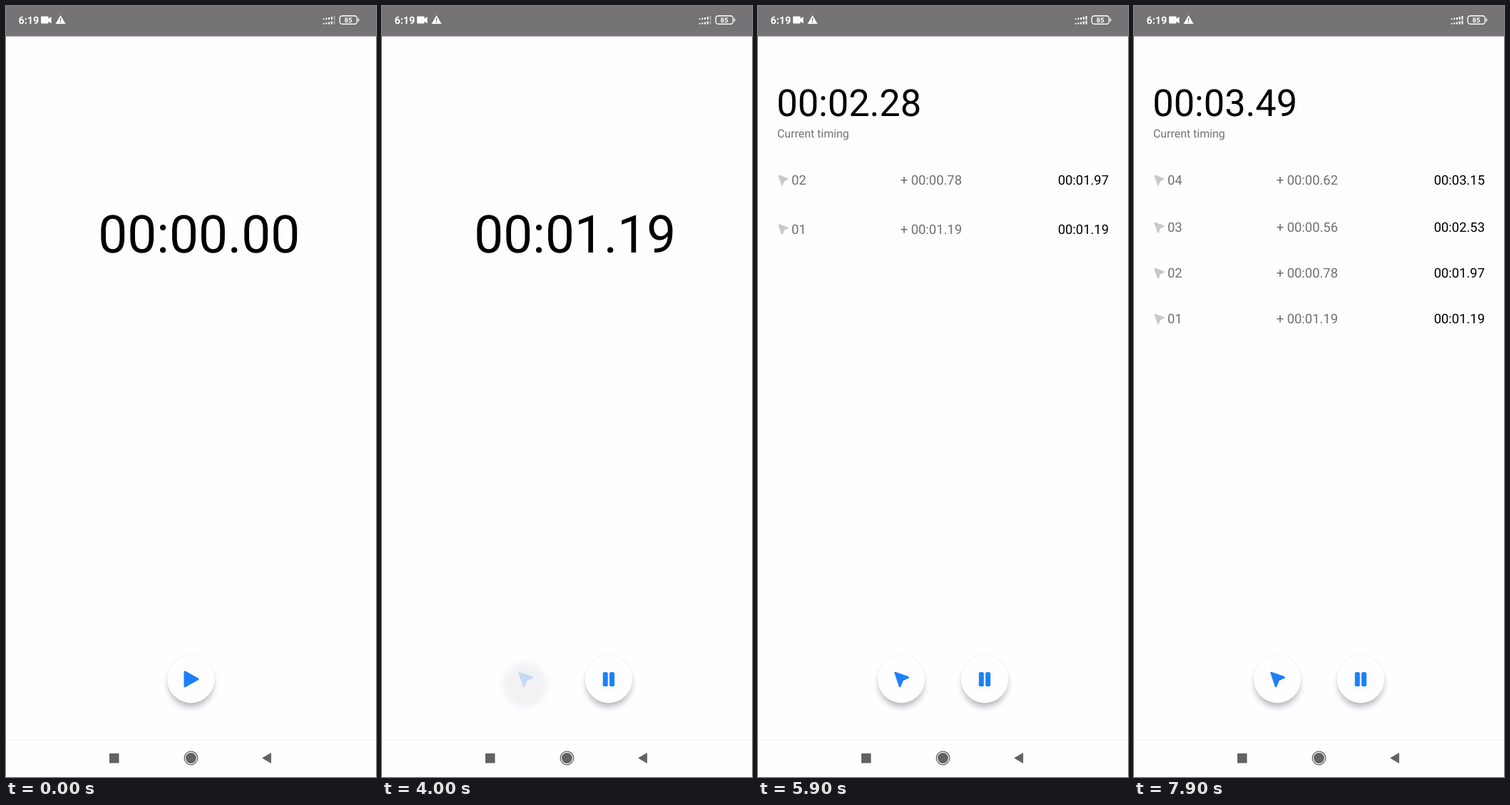
An HTML page that plays this animation: 519 px wide and 1079 px high, repeating every 8 s.

```html
<!DOCTYPE html>
<html lang="en">
<head>
<meta charset="utf-8">
<title>Stopwatch</title>
<style>
html, body { margin: 0; width: 100%; height: 100%; overflow: hidden; background: #fefdff; }
svg { display: block; width: 100vw; height: 100vh; }
text { font-family: Roboto, sans-serif; text-rendering: geometricPrecision; white-space: pre; }
.row text { font-size: 18.4px; fill: #717073; }
.row .total { fill: #000; }
.end { text-anchor: end; }
</style>
</head>
<body>
<svg viewBox="0 0 519 1079">
  <defs>
    <filter id="soft" x="-40%" y="-40%" width="180%" height="180%"><feGaussianBlur stdDeviation="4"/></filter>
    <path id="lap" d="M-8.4 -8.8L9.6 -2.5L1.7 1.2L-2 10Z" stroke-width="2.6" stroke-linejoin="round"/>
    <g id="disc">
      <circle r="34.2" fill="#000" opacity=".045"/>
      <circle r="33.4" fill="#fefdff"/>
    </g>
    <circle id="shade" cy="7.5" r="31.5" fill="#000" opacity=".27" filter="url(#soft)"/>
  </defs>
  <rect width="519" height="1079" fill="#fefdff"/>
  <rect width="519" height="42.5" fill="#767376"/>

  <g fill="#fff">
    <text x="17.5" y="25" font-size="14.4" font-weight="700">6:19</text>
    <path d="M50 14.5H58.5Q59.5 14.5 59.5 15.5V18L63.5 15V24.5L59.5 21.500V23.500Q59.500 24.500 58.500 24.500H50Q49 24.500 49 23.500V15.500Q49 14.500 50 14.500Z"/>
    <path d="M76.500 13L83.500 25H69.500Z"/>
    <path d="M76.500 17.200V21M76.500 22.300V23.700" stroke="#767376" stroke-width="1.400"/>
    <g id="signal"></g>
    <rect x="468.200" y="13.700" width="24.200" height="11.600" rx="3.600" fill="none" stroke="#fff" stroke-width="1.400"/>
    <rect x="493.700" y="17.300" width="1.500" height="4.400" rx=".7"/>
    <text x="480.200" y="22.800" font-size="9.300" font-weight="700" text-anchor="middle">85</text>
  </g>

  <text id="clock" fill="#000"></text>
  <text id="label" x="27" y="184" font-size="15.9" fill="#717073">Current timing</text>
  <g id="rows"></g>

  <g id="lapButton">
    <use href="#shade"/>
    <use href="#disc"/>
    <use href="#lap" fill="#1d80f8" stroke="#1d80f8"/>
  </g>
  <g id="mainButton">
    <use href="#shade"/>
    <use href="#disc"/>
    <g>
      <path id="play" d="M-8.500 -10L9.500 0L-8.500 10Z" fill="#1d80f8" stroke="#1d80f8" stroke-width="3" stroke-linejoin="round"/>
      <g id="pause" fill="#1d80f8">
        <rect x="-8.200" y="-9.800" width="7" height="20" rx="1.900"/>
        <rect x="1.100" y="-9.800" width="7" height="20" rx="1.900"/>
      </g>
    </g>
  </g>

  <rect y="1026" width="519" height="1" fill="#f2f1f3"/>
  <g fill="#636163">
    <rect x="145" y="1046" width="13.500" height="13.500" rx="1"/>
    <circle cx="259.500" cy="1052.500" r="7.400"/>
    <circle cx="259.500" cy="1052.500" r="9.300" fill="none" stroke="#636163" stroke-width="1.300"/>
    <path d="M359 1052.500L372 1045V1060Z"/>
  </g>
</svg>
<script>
const LOOP = 8000, TICK = 100;
const ROW_Y = 243.5, ROW_GAP = 64;
const LAPS = [1.19, 1.97, 2.53, 3.15];
// stage time in ms -> stopwatch seconds
const PACE = [[1800, -0.16], [2000, 0], [2700, 0.42], [4000, 1.19], [5400, 1.99],
  [5900, 2.28], [6900, 2.91], [7900, 3.49], [8000, 3.55]];

const $ = id => document.getElementById(id);
const clamp = v => Math.max(0, Math.min(1, v));
const mix = (a, b, u) => a + (b - a) * u;
const easeOut = u => 1 - (1 - clamp(u)) ** 3;
const two = n => String(n).padStart(2, '0');

function format(sec) {
  const c = Math.max(0, Math.round(sec * 100));
  return two(Math.floor(c / 6000)) + ':' + two(Math.floor(c / 100) % 60) + '.' + two(c % 100);
}

function stopwatch(t) {
  if (t <= PACE[0][0]) return PACE[0][1];
  const i = PACE.findIndex(p => p[0] >= t);
  const [t0, s0] = PACE[i - 1], [t1, s1] = PACE[i];
  return mix(s0, s1, (t - t0) / (t1 - t0));
}

function spring(s) {
  const x = s - 0.05, damp = 10.27, freq = 16;
  if (x <= 0) return 0;
  return 1 - Math.exp(-damp * x) * (Math.cos(freq * x) + damp / freq * Math.sin(freq * x));
}

// opacity of a tapped button, s seconds after the tap fires
function tap(s) {
  if (s < 0) return mix(1, 0.2, clamp((s + 0.15) / 0.1));
  return mix(0.2, 1, clamp(s / 0.25));
}

function place(button, x, alpha) {
  button.setAttribute('transform', `translate(${x} 942)`);
  // layers fade apart, so the shadow shows through a dimmed disc
  [...button.children].forEach(layer => layer.setAttribute('opacity', alpha));
}

$('signal').innerHTML = [19, 25.5].map(base => [1.6, 2.3, 3, 4, 5].map((h, i) =>
  `<rect x="${444.7 + i * 3.7}" y="${base - h}" width="2" height="${h}" ${i === 4 ? 'class="last"' : ''}/>`
).join('')).join('');
const lastBars = document.querySelectorAll('.last');

$('rows').innerHTML = LAPS.map((lap, i) => `<g class="row">
  <use href="#lap" transform="translate(35.200 0) scale(.7)" fill="#c9c8cb" stroke="#c9c8cb"/>
  <text x="47" y="6.500">${two(i + 1)}</text>
  <text class="end" x="286" y="6.500">+ ${format(lap - (LAPS[i - 1] || 0))}</text>
  <text class="end total" x="492" y="6.500">${format(lap)}</text></g>`).join('');
const rows = [...$('rows').children];

function draw(t) {
  const sec = stopwatch(t);
  const dock = easeOut((sec - LAPS[0] - 0.04) / 0.28);
  const clock = $('clock');
  clock.textContent = format(sec);
  clock.setAttribute('x', mix(129.3, 26.3, dock));
  clock.setAttribute('y', mix(345, 153.5, dock));
  clock.setAttribute('font-size', mix(73, 52.3, dock));
  $('label').setAttribute('opacity', dock);

  rows.forEach((row, i) => {
    const shift = LAPS.slice(i + 1).reduce((sum, lap) => sum + spring(sec - lap), 0);
    row.setAttribute('transform', `translate(0 ${ROW_Y + ROW_GAP * shift})`);
    row.setAttribute('opacity', clamp((sec - LAPS[i] - 0.05) / 0.2));
  });

  const split = easeOut(sec / 0.28);
  const running = sec > 0.02;
  const press = Math.min(...LAPS.map(lap => tap(sec - lap)));
  place($('lapButton'), mix(259.5, 201, split), press * split);
  place($('mainButton'), mix(259.5, 318, split), tap(sec));
  $('play').setAttribute('visibility', running ? 'hidden' : 'visible');
  $('pause').setAttribute('visibility', running ? 'visible' : 'hidden');
  lastBars.forEach(bar => bar.setAttribute('opacity', t < 5500 ? 0.4 : 1));
}

const start = performance.now();
function frame() {
  const t = (performance.now() - start) % LOOP;
  draw(Math.floor(t / TICK) * TICK);
  requestAnimationFrame(frame);
}
frame();
</script>
</body>
</html>
```
